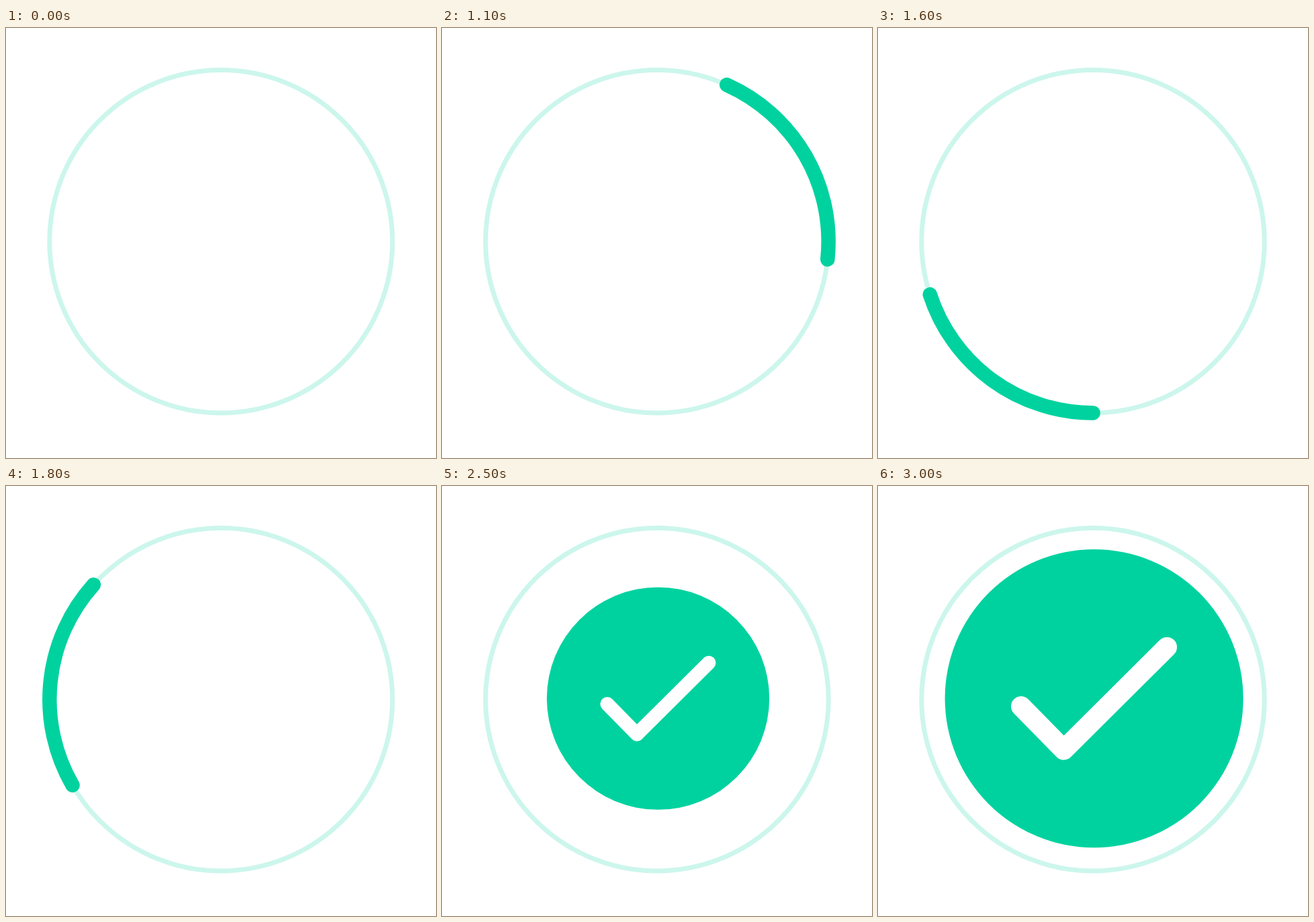
Write an HTML page that moves like this. It is 640 px wide and 640 px high and loops after 3.6 s.

```html
<!DOCTYPE html>
<html lang="en">
<head>
<meta charset="utf-8">
<title>Loading to success</title>
<style>
  html, body { margin: 0; width: 100%; height: 100%; overflow: hidden; background: #fff; }
  svg { display: block; width: 100%; height: 100%; }
  path { fill: none; stroke-linecap: round; stroke-linejoin: round; }
</style>
</head>
<body>
<svg viewBox="0 0 640 640">
  <circle cx="320" cy="317.75" r="255.2" fill="none" stroke="#ccf6ec" stroke-width="7"/>
  <path id="arc" stroke="#00d29f" stroke-width="21.5"/>
  <g transform="translate(321.6 316.25)">
    <circle id="disc" r="222" fill="#00d29f"/>
    <path id="check" d="M-108.6 11.7 L-45.1 76.4 L108.4 -76.3" stroke="#fff" stroke-width="30"/>
  </g>
</svg>
<script>
const LOOP = 3600, STEP = 100, TICK = 40;
const DEGREES_PER_TICK = 12, ARC_TICKS = 6, TURN_TICKS = 30, SPIN_START = 19;
const SETTLED = 3000;
const [arc, disc, check] = ['arc', 'disc', 'check'].map(id => document.getElementById(id));

const clamp = (value, low, high) => Math.min(high, Math.max(low, value));

function ringPoint(ticks) {
  const angle = ticks * DEGREES_PER_TICK * Math.PI / 180;
  return `${320 + 255.2 * Math.sin(angle)} ${317.75 - 255.2 * Math.cos(angle)}`;
}

function drawArc(time) {
  const ticks = Math.floor(time / TICK) - SPIN_START;
  const head = clamp(ticks, 0, TURN_TICKS);
  const tail = clamp(ticks - ARC_TICKS, 0, TURN_TICKS);
  arc.setAttribute('d', head > tail
    ? `M${ringPoint(tail)} A255.2 255.2 0 0 1 ${ringPoint(head)}` : '');
}

// Quintic ease-out from nothing to full size.
function pop(element, time, start) {
  const progress = clamp((time - start) / (SETTLED - start), 0, 1);
  element.setAttribute('transform', `scale(${1 - (1 - progress) ** 5})`);
}

function draw() {
  const elapsed = performance.now() % LOOP;
  const time = Math.floor(elapsed / STEP) * STEP;
  const tickTime = Math.floor(time / TICK) * TICK;
  drawArc(time);
  pop(disc, tickTime, 2316);
  pop(check, tickTime, 2340);
  requestAnimationFrame(draw);
}
draw();
</script>
</body>
</html>
```
